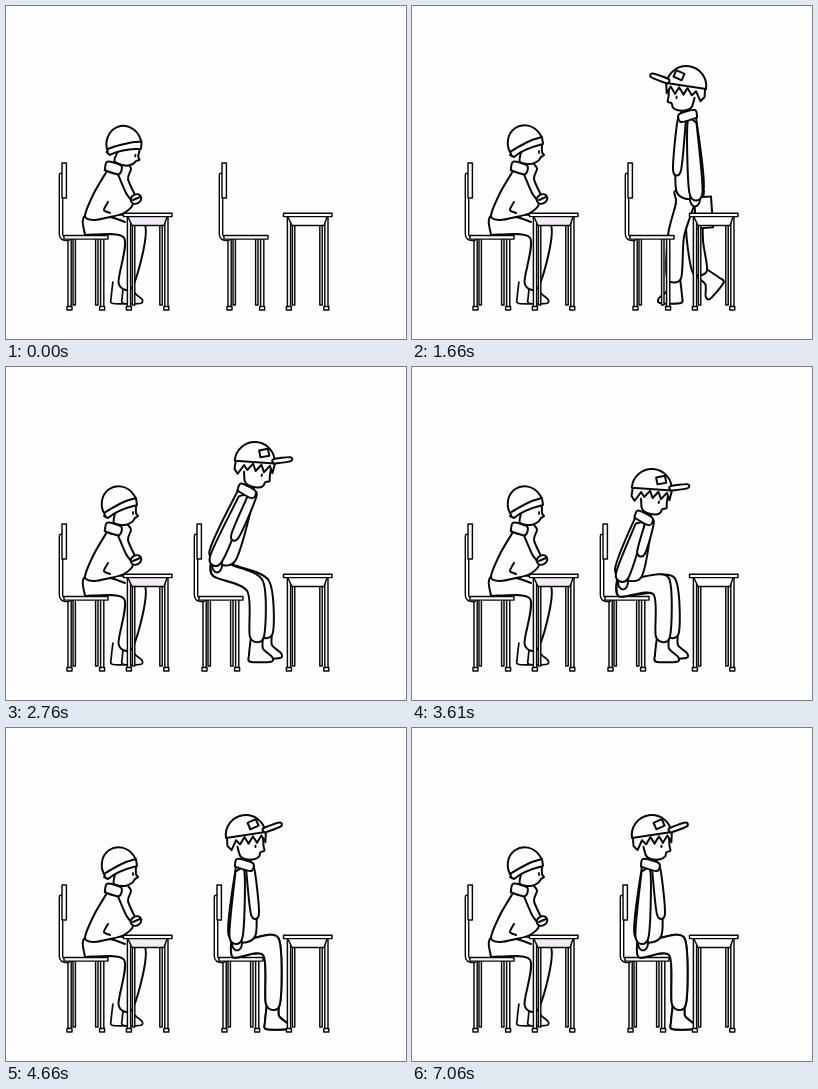
An HTML page with a canvas that plays this animation: 400 px wide and 333 px high, repeating every 8000 ms.

```html
<!DOCTYPE html>
<html lang="en">
<head>
<meta charset="utf-8">
<title>Taking a seat</title>
<style>
html, body { margin: 0; width: 100%; height: 100%; overflow: hidden; background: #fefefe; }
canvas { display: block; }
</style>
</head>
<body>
<canvas id="stage" width="400" height="333"></canvas>
<script>
const ctx = document.getElementById('stage').getContext('2d');
const PAPER = '#fefefe', INK = '#080808', LOOP = 8000;
const add = ([x, y], dx, dy) => [x + dx, y + dy];

// Drawing helpers
function curve(points) {
  ctx.beginPath();
  ctx.moveTo(...points[0]);
  for (let i = 0; i < points.length - 1; i++) {
    const a = points[i], b = points[i + 1];
    const before = points[i - 1] || a, after = points[i + 2] || b;
    ctx.bezierCurveTo(
      a[0] + (b[0] - before[0]) / 7, a[1] + (b[1] - before[1]) / 7,
      b[0] - (after[0] - a[0]) / 7, b[1] - (after[1] - a[1]) / 7, ...b);
  }
}
function paint(fill = PAPER) {
  ctx.fillStyle = fill;
  ctx.fill();
  ctx.stroke();
}
function shape(...points) { curve(points); paint(); }
function line(...points) { curve(points); ctx.stroke(); }
function oval(x, y, rx, ry, degrees = 0, from = 0, to = 2 * Math.PI) {
  ctx.beginPath();
  ctx.ellipse(x, y, rx, ry, degrees * Math.PI / 180, from, to);
}
function bar(x, y, w, h) {
  ctx.beginPath();
  ctx.rect(x, y, w, h);
  paint();
}
function eye(x, y) {
  oval(x, y, 1, 1.9);
  ctx.fillStyle = INK;
  ctx.fill();
}

// Outline around a centre line whose width runs from w0 to w1.
function limb(points, w0, w1 = w0) {
  const last = points.length - 1;
  const heading = i => Math.atan2(points[i + 1][1] - points[i][1], points[i + 1][0] - points[i][0]);
  const near = [], far = [];
  points.forEach((p, i) => {
    const a = heading(Math.max(0, i - 1)), b = heading(Math.min(last - 1, i));
    const bend = Math.atan2(Math.sin(b - a), Math.cos(b - a)) / 2;
    const r = (w0 + (w1 - w0) * i / last) / 2 / Math.max(0.65, Math.cos(bend));
    const dx = -Math.sin(a + bend) * r, dy = Math.cos(a + bend) * r;
    near.push(add(p, dx, dy));
    far.unshift(add(p, -dx, -dy));
  });
  shape(...near, ...far, near[0]);
}

function local(draw, x, y, degrees = 0, sx = 1, sy = sx) {
  ctx.save();
  ctx.translate(x, y);
  ctx.rotate(degrees * Math.PI / 180);
  ctx.scale(sx, sy);
  draw();
  ctx.restore();
}

// Furniture
function furniture(x, draw) {
  local(() => {
    ctx.lineWidth = 1.45;
    draw();
  }, x, 0);
}
function legPair(left, right) {
  for (const [x, inward] of [[left, 1], [right, -1]]) {
    bar(x + inward * 5, 213, 2.4, 86);
    bar(x, 211, 3.2, 90);
    bar(x - 1, 300.5, 5, 3.5);
  }
}
const chair = x => furniture(x, () => {
  ctx.save();
  ctx.beginPath();
  ctx.rect(0, 231, 400, 100);
  ctx.clip();
  legPair(62, 94.6);
  ctx.restore();
  ctx.beginPath();
  ctx.moveTo(55, 169);
  ctx.lineTo(55, 228);
  ctx.quadraticCurveTo(55, 233, 62, 233);
  for (const [width, color] of [[4.8, INK], [2, PAPER]]) {
    ctx.lineWidth = width;
    ctx.strokeStyle = color;
    ctx.stroke();
  }
  ctx.lineWidth = 1.45;
  ctx.strokeStyle = INK;
  bar(56, 157, 4.4, 35);
  bar(58, 229.5, 44, 3.6);
});
const desk = (x, tint) => furniture(x, () => {
  legPair(121.4, 158.8);
  ctx.beginPath();
  ctx.moveTo(122, 211);
  ctx.lineTo(126, 219.5);
  ctx.lineTo(158, 219.5);
  ctx.lineTo(161, 211);
  paint(tint);
  bar(117.5, 207.3, 48.5, 3.3);
});

// Shoe with its ankle at the given point, toe to the right.
function shoe([x, y], degrees = 0, size = 1) {
  local(() => shape([-6, 0], [-8, 18], [-7, 25], [14, 25], [15, 20], [6, 12], [6, 0]),
    x, y, degrees, size);
}

// Seated woman, drawn around her neck
function womanHead() {
  shape([-3, -12], [-4, -2], [7, 0], [14, -3], [17, -7], [20, -9], [18, -12], [18, -22]);
  oval(1.5, -20, 17.5, 19, -24, Math.PI * 0.94, Math.PI * 2.04);
  ctx.lineTo(19, -20);
  ctx.quadraticCurveTo(-1, -15, -10, -7);
  ctx.lineTo(-14, -9);
  paint();
  line([-14, -12], [-4, -18], [8, -24], [18, -27]);
  eye(15, -12);
}
function woman(lookDown) {
  shoe([112, 276], 0, 0.85);
  shoe([123, 276], 0, 0.85);
  limb([[80, 219], [128, 224], [120, 278]], 20, 15);
  shape([101, 165], [88, 187], [79, 210], [88, 214], [104, 211], [118, 207], [127, 198], [120, 187], [111, 166]);
  line([104, 211], [111, 213], [119, 216]);
  line([102, 196], [98, 204], [104, 207]);
  line([122, 158], [125, 163], [122, 173], [129, 189]);
  oval(130, 193, 5.5, 4.5, -30);
  paint();
  line([127, 194], [134, 191]);
  limb([[100, 160], [114, 164]], 9);
  local(womanHead, 112, 158, lookDown ? 13 : 0);
}

// Man, facing right; the head is drawn around his neck
function manHead() {
  limb([[-8, 0], [8, 4]], 8);
  shape([-7, -16], [-4, -7], [1, -4], [10, -4], [15, -7], [16, -11], [20, -13], [19, -18], [18, -31]);
  ctx.beginPath();
  ctx.moveTo(-18, -28);
  for (let i = 0; i < 10; i++) {
    ctx.lineTo(-17 + i * 4.2, -25 - i * 0.5 + (i % 2 ? 8 : 1) + Math.max(0, 3 - i) * 2.5);
  }
  ctx.lineTo(21, -31);
  paint();
  oval(1, -28, 20, 20, -10, Math.PI, 2 * Math.PI);
  ctx.closePath();
  paint();
  limb([[19, -33], [35, -39.5]], 4.5, 4);
  local(() => bar(-4.5, -3.5, 9, 7), 8, -39, -25);
  eye(11, -17);
}

function man({ hip, spine, legs, wrist = add(hip, -6, 2), bag }) {
  const neck = add(hip, ...spine);
  const lean = Math.atan2(spine[0], -spine[1]) * 180 / Math.PI;
  for (const { knee, ankle, pitch = 0, start = 0 } of legs) {
    shoe(ankle, pitch);
    limb([add(hip, start, 0), add(hip, start, 13), knee, ankle], 20, 14);
  }
  if (bag) local(() => bar(-8, 0, 17, 31), hip[0] - 13, hip[1] + 6, 4);
  limb([neck, hip], 15, 27);
  oval(wrist[0] + 1, wrist[1] + 6, 5, 7.5);
  paint();
  limb([add(neck, -4, 9), wrist], 9, 13);
  limb([add(neck, 6, 5), add(hip, 13, -21)], 8);
  local(manHead, ...neck, Math.min(14, lean));
}

// Alternates an open stride with a lifted trailing foot.
function walker(x, passing, wrist) {
  const lift = passing ? 4 : 0;
  local(() => man({
    hip: [235, 185 - lift],
    spine: [2, -77],
    wrist,
    bag: true,
    legs: [
      { start: -4, knee: [230 - lift, 235], ankle: [225 - lift, 266], pitch: 50 },
      { start: 5, knee: [249 - lift, 230], ankle: [251 - lift, 272] }
    ]
  }), 513 + x, 0, 0, -1, 1);
}

function sitter(hip, spine, feet, spread) {
  const leg = gap => ({
    knee: [feet + gap * 0.7 - 2, 219],
    ankle: [feet + gap, 276 - spread * 0.7 - gap * 0.4]
  });
  man({ hip, spine, legs: [leg(spread), leg(0)] });
}

const UPRIGHT = [2, -72], BOWED = [16, -58], RISING = [25, -68], TALL = [11, -85];

// Start, chair position, spine, feet, gap between feet, hip height
const seating = [
  [2560, 135, UPRIGHT, 251, 9, 181],
  [2760, 135, RISING, 251, 9, 190],
  [2860, 135, BOWED, 251, 9],
  [3010, 135, UPRIGHT, 251, 9],
  [3610, 135, BOWED, 251, 9],
  [3910, 145, BOWED, 261, 9],
  [4160, 145, BOWED, 264, 0],
  [4460, 155, BOWED, 267, 0],
  [4660, 155, UPRIGHT, 267, 0],
  [5860, 155, TALL, 267, 0],
  [7060, 155, UPRIGHT, 267, 0]
];

function arrival(t) {
  const chairX = t < 2260 ? 160 : 135;
  if (t >= 2060) {
    walker(-29, false, [427 - chairX, 165]);
  } else if (t >= 700) {
    const step = Math.floor((t - 700) / 158.6);
    walker(19.3 * (6 - step) + 10 * Math.max(0, 2 - step), step % 2 === 1);
  }
  chair(chairX);
}
function settle(t) {
  const [start, chairX, spine, feet, spread, hipY = 207] = seating.filter(s => s[0] <= t).pop();
  chair(chairX);
  sitter([start < 2760 ? 254 : chairX + 81, hipY], spine, feet, spread);
}

function render() {
  const t = performance.now() % LOOP;
  ctx.fillStyle = PAPER;
  ctx.fillRect(0, 0, 400, 333);
  ctx.lineWidth = 2;
  ctx.strokeStyle = INK;
  ctx.lineJoin = ctx.lineCap = 'round';

  chair(0);
  woman(t < 1020);
  desk(0, '#f3eaf6');

  if (t < 2560) arrival(t); else settle(t);
  desk(160, PAPER);
  requestAnimationFrame(render);
}
render();
</script>
</body>
</html>
```
